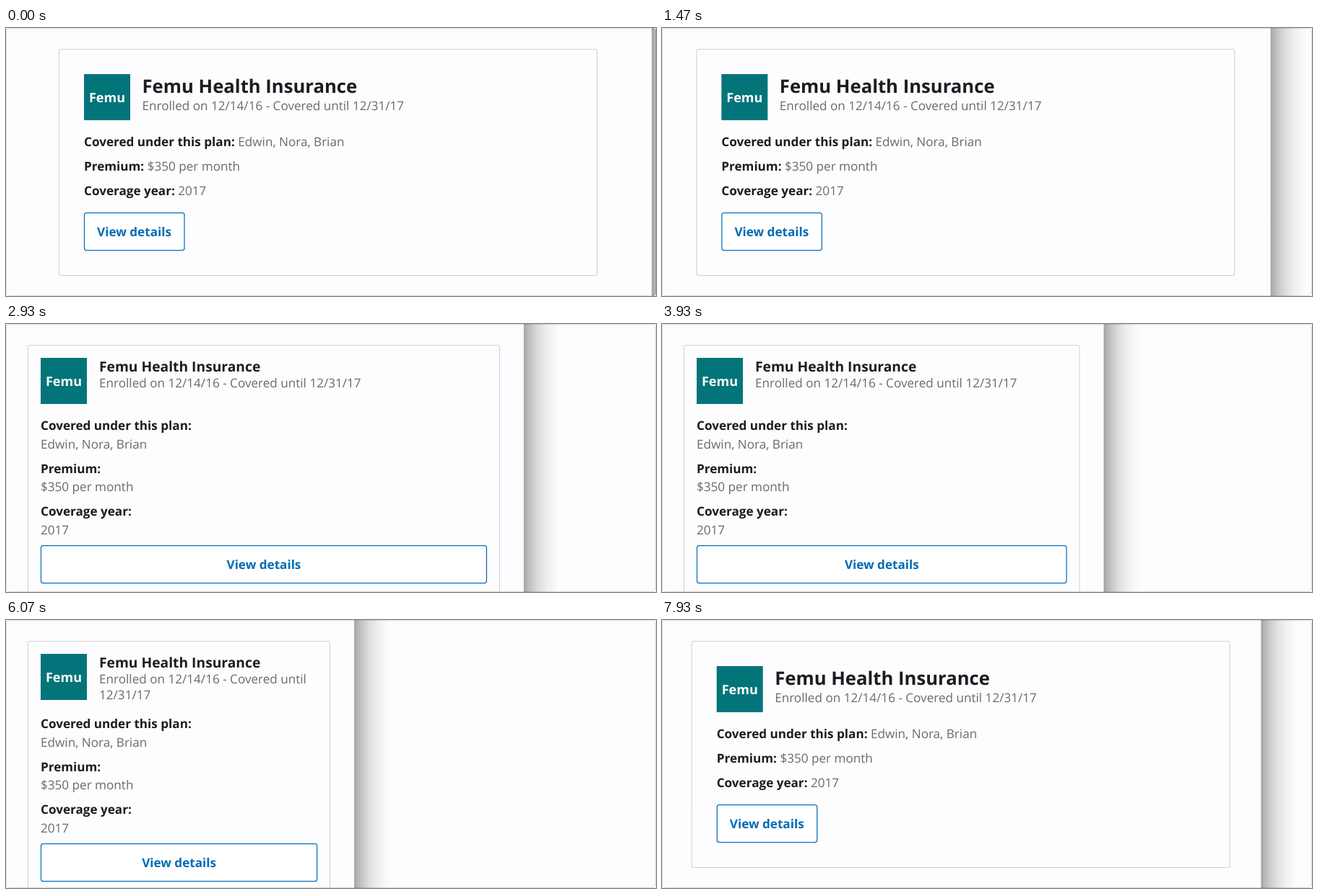
An HTML page that plays this animation: 900x372 px, repeating every 8 s.

```html
<!DOCTYPE html>
<html lang="en">
<head>
<meta charset="utf-8">
<title>Responsive plan card</title>
<style>
  html, body { margin: 0; width: 100%; height: 100%; overflow: hidden; background: #fff; }
  svg { display: block; width: 900px; height: 372px; }
  text { font: 17.12px "Open Sans", sans-serif; fill: #6b6a6f; text-rendering: geometricPrecision; white-space: pre; }
  .b { font-weight: 700; fill: #1d1c20; }
  .h1 { font-size: 25.68px; }
  .h2 { font-size: 19.26px; }
  .logo { font-size: 18px; font-weight: 700; fill: #fff; text-anchor: middle; }
  .link { font-weight: 700; fill: #006bb6; text-anchor: middle; }
  .card { fill: none; stroke: #d2d1d5; stroke-width: 1.1; }
  .btn { fill: #fff; stroke: #0a6fb9; stroke-width: 1.25; }
</style>
</head>
<body>
<svg id="stage" viewBox="0 0 900 372">
  <defs>
    <linearGradient id="shade">
      <stop offset="0" stop-opacity=".36"/>
      <stop offset=".08" stop-opacity=".29"/>
      <stop offset=".2" stop-opacity=".22"/>
      <stop offset=".4" stop-opacity=".13"/>
      <stop offset=".65" stop-opacity=".055"/>
      <stop offset="1" stop-opacity="0"/>
    </linearGradient>
    <clipPath id="frame"><rect width="900" height="372" rx="4"/></clipPath>
  </defs>
  <g clip-path="url(#frame)">
    <rect width="900" height="372" fill="#fdfcfe"/>
    <rect id="shadow" width="50" height="372" fill="url(#shade)"/>
    <g id="wide"></g>
    <g id="narrow"></g>
  </g>
  <rect x=".5" y=".5" width="899" height="371" rx="3.5" fill="none" stroke="#000" stroke-opacity=".13"/>
</svg>
<script>
const $ = id => document.getElementById(id);
const BRAND = 'Femu';
const TITLE = BRAND + ' Health Insurance';
const SINCE = 'Enrolled on 12/14/16 - Covered until';
const UNTIL = '12/31/17';
const FACTS = [
  ['Covered under this plan:', 'Edwin, Nora, Brian'],
  ['Premium:', '$350 per month'],
  ['Coverage year:', '2017']
];
const BREAK = 808, WRAP = 543, LOOP = 8000, FPS = 15;

const text = (x, y, str, cls = '', id = '') =>
  `<text x="${x}" y="${y}" class="${cls}" id="${id}">${str}</text>`;
const logo = (x, y) =>
  `<rect x="${x}" y="${y}" width="64" height="64" fill="#03757a"/>` +
  text(x + 32, y + 39, BRAND, 'logo');

// Wide layout, x measured from the card's left edge
$('wide').innerHTML =
  '<rect class="card" x=".5" y="29.5" width="745" height="314" rx="3"/>' +
  logo(35, 64) +
  text(115.5, 90, TITLE, 'b h1') +
  text(115.5, 114, SINCE + ' ' + UNTIL) +
  FACTS.map(([k, v], i) =>
    text(35, 164 + 34 * i, `<tspan class="b">${k}</tspan> ${v}`)).join('') +
  '<rect class="btn" x="35.5" y="256.5" width="138.5" height="52" rx="3"/>' +
  text(104.5, 289, 'View details', 'link');

$('narrow').innerHTML =
  '<rect class="card" id="card" x="30.5" y="29.5" height="400" rx="3"/>' +
  logo(48, 47) +
  text(129, 66, TITLE, 'b h2') +
  text(129, 88.3, SINCE, '', 'since') +
  text(129, 109.8, UNTIL, '', 'until') +
  '<g id="rest">' +
  FACTS.map(([k, v], i) =>
    text(48, 147 + 59.6 * i, k, 'b') + text(48, 172.7 + 59.6 * i, v)).join('') +
  '<rect class="btn" id="btn" x="48.5" y="307.5" height="52" rx="3"/>' +
  text(0, 340, 'View details', 'link', 'label') +
  '</g>';

// Dragged page width: [time, width]
const KEYS = [
  [0, 894], [930, 879.2], [1730, 823], [2000, 805], [2600, 750], [3470, 661],
  [3930, 612], [4330, 566], [5270, 494], [5850, 482], [6930, 548],
  [7800, 811], [7930, 829], [8070, 846]
];
const rate = i => (KEYS[i + 1][1] - KEYS[i][1]) / (KEYS[i + 1][0] - KEYS[i][0]);

function slope(i) {
  if (i === 0) return -0.004;
  if (i === KEYS.length - 1) return rate(i - 1);
  const a = rate(i - 1), b = rate(i);
  if (a * b < 0) return 0;
  const h = KEYS[i][0] - KEYS[i - 1][0], k = KEYS[i + 1][0] - KEYS[i][0];
  return (a * k + b * h) / (h + k);
}

function pageWidth(t) {
  let i = 0;
  while (i < KEYS.length - 2 && t >= KEYS[i + 1][0]) i++;
  const [t0, p] = KEYS[i], [t1, q] = KEYS[i + 1];
  const d = t1 - t0, s = (t - t0) / d, r = 1 - s;
  return r * r * (1 + 2 * s) * p + s * s * (3 - 2 * s) * q
    + d * s * r * (r * slope(i) - s * slope(i + 1));
}

const set = (id, name, value) => $(id).setAttribute(name, value);
const show = (id, on) => set(id, 'display', on ? 'inline' : 'none');

function render(t) {
  const step = Math.floor((t % LOOP + 4) * FPS / 1000) % (LOOP * FPS / 1000);
  const w = pageWidth(step * 1000 / FPS);
  const isWide = w >= BREAK, wrapped = w < WRAP;
  set('shadow', 'x', w);
  show('wide', isWide);
  show('narrow', !isWide);
  if (isWide) {
    set('wide', 'transform', `translate(${w / 2 - 374} 0)`);
    return;
  }
  set('card', 'width', w - 64);
  set('btn', 'width', w - 100);
  set('label', 'x', (w - 3) / 2);
  $('since').textContent = wrapped ? SINCE : SINCE + ' ' + UNTIL;
  show('until', wrapped);
  set('rest', 'transform', `translate(0 ${wrapped ? 3.2 : 0})`);
}

const start = performance.now();
function tick() {
  render(performance.now() - start);
  requestAnimationFrame(tick);
}
tick();
</script>
</body>
</html>
```
